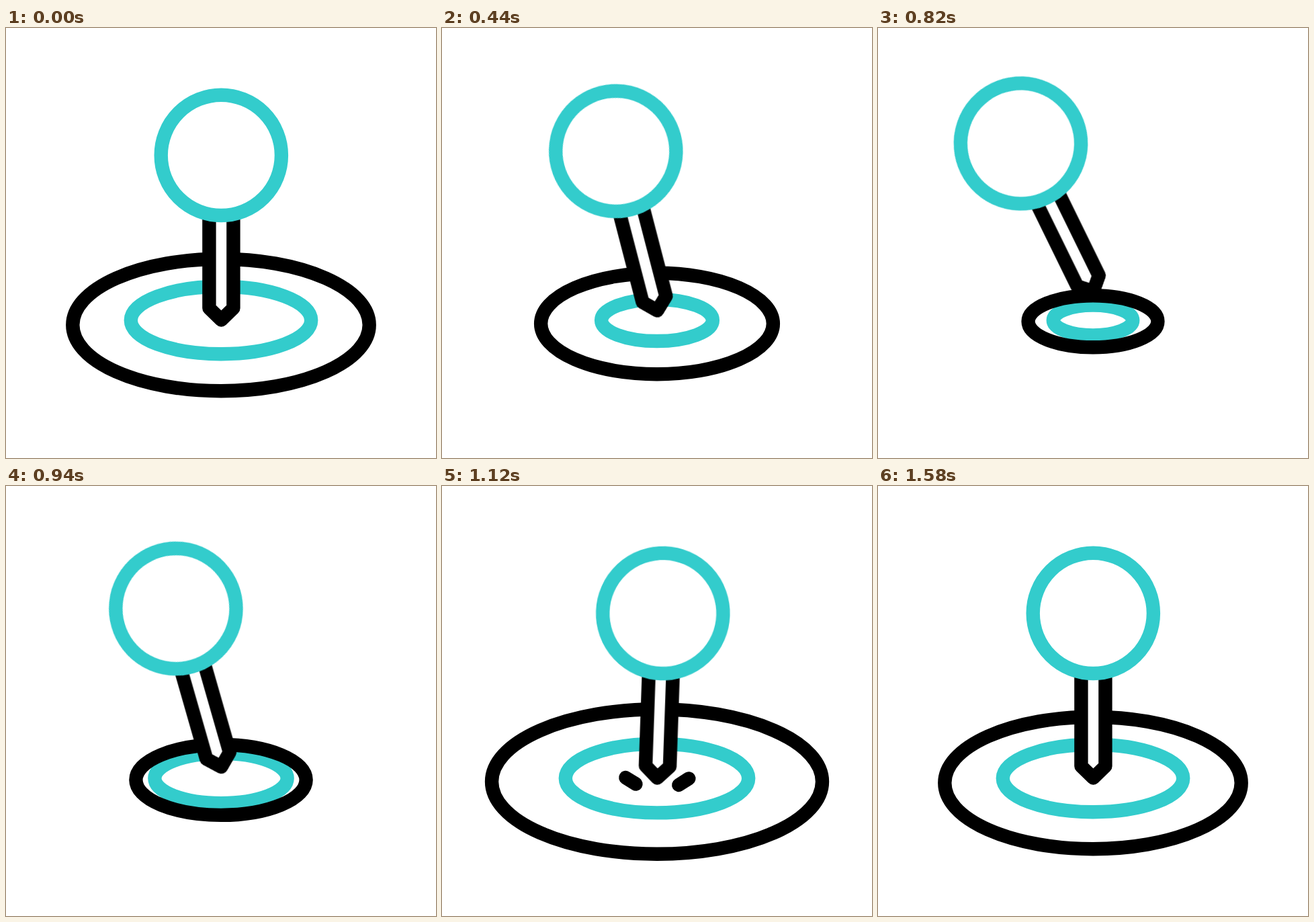
Animation, 640 px wide and 640 px high, one loop 3 s. Source, as an HTML page:

```html
<!DOCTYPE html>
<html lang="en">
<head>
<meta charset="utf-8">
<title>Pin and ripples</title>
<style>
  html, body { margin: 0; width: 100%; height: 100%; overflow: hidden; background: #fff; }
  svg { display: block; width: 100vw; height: 100vh; }

  .line { fill: none; stroke: #000; stroke-width: 20.4; stroke-linecap: round; stroke-linejoin: round; }
  .teal { stroke: #3cc; }
  .solid { fill: #fff; }

  .anim {
    animation: 3s cubic-bezier(.3333, 0, .6667, 1) infinite;
    transform-origin: 320.4px 434.5px;
  }
  .outer { animation-name: outer; }
  .inner { animation-name: inner; }
  .lift { animation-name: lift; }
  .tilt { animation-name: tilt; }
  .spark { animation-name: show, grow, leave; stroke-dasharray: 0 100; }

  @keyframes outer {
    0%, 4.43% { rx: 220.7px; ry: 98.3px; cy: 442px; }
    28.9% { rx: 95px; ry: 37.8px; cy: 436.7px; }
    37.27% { rx: 246px; ry: 107.8px; cy: 440px; }
    44.43% { rx: 191px; ry: 80.9px; cy: 437.65px; }
    52.77%, 100% { rx: 220.7px; ry: 98.3px; cy: 442px; }
  }
  @keyframes inner {
    0%, 5% { rx: 134.2px; ry: 50.2px; }
    23.33% { rx: 39.8px; ry: 15px; }
    37.33% { rx: 136.2px; ry: 51.4px; }
    44.43% { rx: 129.4px; ry: 48.6px; }
    52.77%, 100% { rx: 134.2px; ry: 50.2px; }
  }
  @keyframes lift {
    0% { transform: translateY(0); }
    11.07% { transform: translateY(0); animation-timing-function: cubic-bezier(.3333, .162, .6667, .55); }
    22.2% { transform: translateY(-62px); }
    36.03%, 100% { transform: translateY(0); }
  }
  @keyframes tilt {
    0% { transform: rotate(0deg); }
    27.33% { transform: rotate(-26.1deg); }
    37.27% { transform: rotate(2deg); }
    52.77%, 100% { transform: rotate(0deg); }
  }
  @keyframes show {
    0%, 35% { visibility: hidden; animation-timing-function: step-end; }
    35.01% { visibility: visible; animation-timing-function: step-end; }
    46%, 100% { visibility: hidden; }
  }
  @keyframes grow {
    0%, 35% { stroke-dasharray: 0 100; }
    39.33%, 100% { stroke-dasharray: 31.4 100; }
  }
  @keyframes leave {
    0%, 37.33% { stroke-dashoffset: 0; }
    46%, 100% { stroke-dashoffset: -31.4; }
  }
</style>
</head>
<body>
<svg viewBox="0 0 640 640">
  <ellipse class="line teal anim inner" cx="320" cy="435" rx="134.2" ry="50.2"/>
  <ellipse class="line anim outer" cx="320" cy="442" rx="220.7" ry="98.3"/>
  <path class="line anim spark" d="M288.5 443.5L262 427"/>
  <path class="line anim spark" d="M352.3 445L379 428"/>
  <g class="anim lift">
    <g class="anim tilt">
      <path class="line solid" d="M302.4 240V417L320.4 434.5L338.4 417V240"/>
      <circle class="line teal solid" cx="320.3" cy="189.4" r="89.6"/>
    </g>
  </g>
</svg>
</body>
</html>
```
